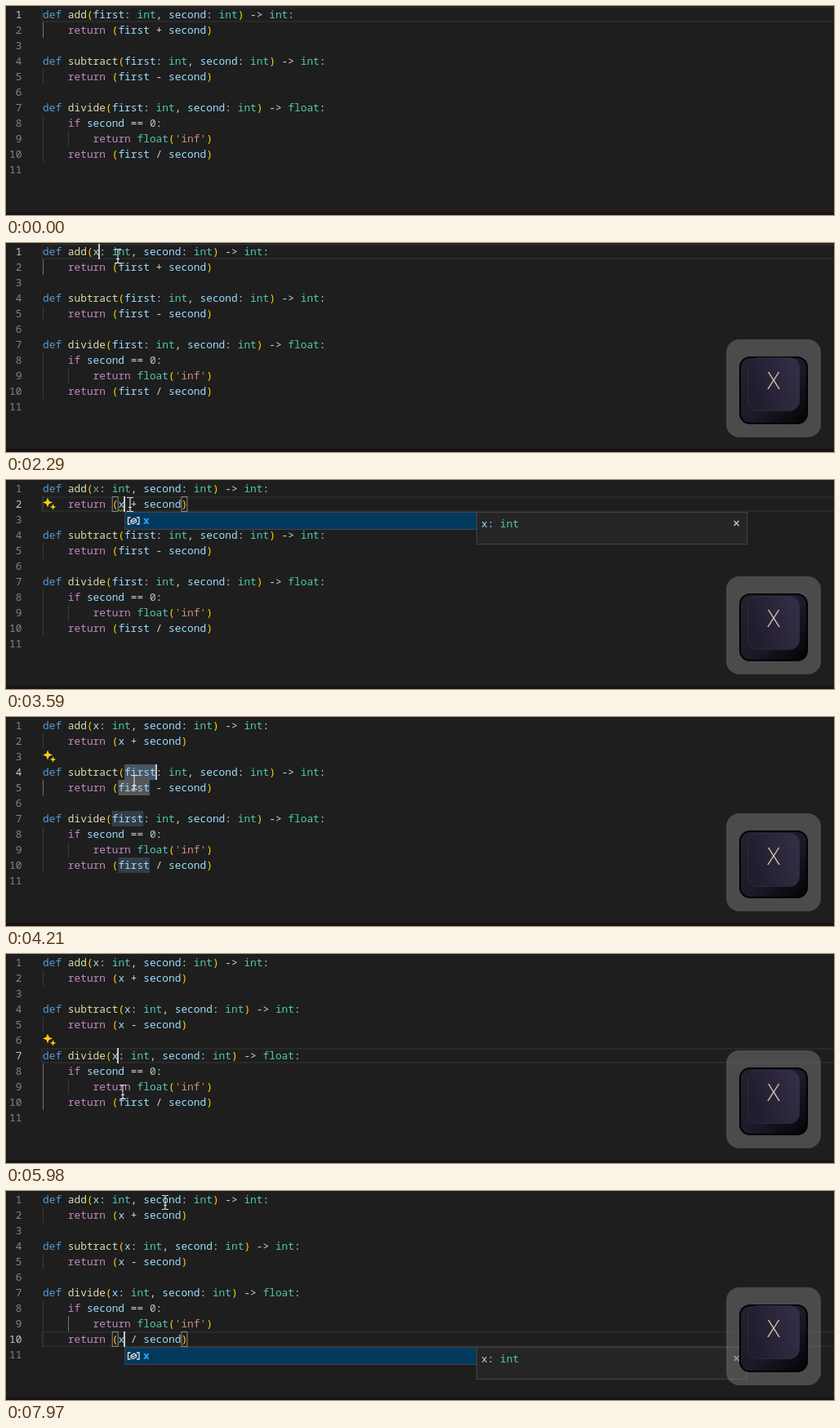
These frames come from a looping animation (1014x256 px, 8 s). An HTML page:

```html
<!DOCTYPE html>
<html lang="en">
<head>
<meta charset="utf-8">
<title>Renaming a parameter</title>
<style>
  html, body { margin: 0; width: 100%; height: 100%; overflow: hidden; background: #1e1e1e; }
  svg { display: block; width: 1014px; height: 256px; }
  text { font: 12.83px "Noto Sans Mono", "DejaVu Sans Mono", monospace; white-space: pre; }
  #letter { font: 300 29px "Open Sans", "Noto Sans", sans-serif; }
</style>
</head>
<body>
<svg viewBox="0 0 1014 256">
  <defs>
    <linearGradient id="base" x1="0" y1="0" x2="1" y2="1">
      <stop offset="0" stop-color="#23222f"/>
      <stop offset=".55" stop-color="#1b1a28"/>
      <stop offset="1" stop-color="#020204"/>
    </linearGradient>
    <linearGradient id="cap" x1="0" y1=".3" x2="1" y2="0">
      <stop offset="0" stop-color="#211c2e"/>
      <stop offset="1" stop-color="#353048"/>
    </linearGradient>
  </defs>
  <rect width="1014" height="256" fill="#1e1e1e"/>
  <g id="editor"></g>
  <rect y="252" width="1014" height="4" fill="#1a1316"/>
  <g id="key">
    <rect x="882" y="118" width="116" height="120" rx="16" fill="#787878" opacity=".5"/>
    <rect x="899" y="140" width="82" height="81" rx="12" fill="url(#base)" stroke="#000" stroke-width="2"/>
    <g id="top">
      <rect x="908.5" y="140.5" width="63" height="65" rx="12" fill="url(#cap)" stroke="#3a3549" stroke-opacity=".6"/>
      <text id="letter" x="940" y="178.500" text-anchor="middle" fill="#d3c9ab">X</text>
    </g>
  </g>
  <g id="pointer">
    <circle id="ring" r="11.5" fill="#d8d21c" opacity=".68"/>
    <path d="M-4-8.500h2.500q1.500 0 1.500 1.500V7q0 1.500-1.500 1.500H-4M4-8.500H1.500Q0-8.500 0-7V7q0 1.500 1.500 1.500H4M-2 3.500h4" fill="none" stroke="#e4e4e4" stroke-width="1.100"/>
  </g>
</svg>
<script>
const LOOP = 8000, CW = 7.7, LH = 19, LEFT = 45;
const $ = id => document.getElementById(id);

const code = [
  "def add(first: int, second: int) -> int:",
  "    return (first + second)",
  "",
  "def subtract(first: int, second: int) -> int:",
  "    return (first - second)",
  "",
  "def divide(first: int, second: int) -> float:",
  "    if second == 0:",
  "        return float('inf')",
  "    return (first / second)",
  ""
];

const colors = [
  [/^def$/, "#569cd6"],
  [/^(return|if)$/, "#c586c0"],
  [/^(int|float)$/, "#4ec9b0"],
  [/^(add|subtract|divide)$/, "#dcdcaa"],
  [/^[a-z]+$/, "#9cdcfe"],
  [/^[()]$/, "#ffd700"],
  [/^'/, "#ce9178"],
  [/^\d/, "#b5cea8"]
];

// One entry per rename: click, double click, typing; then optional follow-ups.
const edits = [
  { row: 1, click: 1290, pick: 1430, type: 1990, hint: [2, 1620, 2060], dim: [2390, 3660] },
  { row: 2, click: 2830, pick: 3040, type: 3450, hint: [2, 3240, 3660], warn: 2390, popup: [3590, 3810] },
  { row: 4, click: 3810, pick: 4010, type: 4290, hint: [3, 4150, 4400], dim: [4690, 5310] },
  { row: 5, click: 4750, pick: 4890, type: 5170, hint: [5, 5000, 5310], warn: 4690, popup: [5310, 5570] },
  { row: 7, click: 5570, pick: 5710, type: 5840, hint: [6, 5770, 6100], dim: [6240, 7000] },
  { row: 10, click: 6380, pick: 6520, type: 6660, warn: 6240, popup: [6730, LOOP] }
];

// time, x, y
const path = [
  [70, 869, 249], [270, 460, 200], [470, 457, 198], [1220, 115, 10], [1430, 122, 12],
  [1620, 125, 13], [2000, 125, 13], [2630, 152, 20], [2830, 152, 29], [3590, 152, 30],
  [3810, 153, 66], [4010, 154, 69], [4210, 157, 80], [4400, 152, 87], [5170, 152, 87],
  [5570, 150, 124], [5710, 148, 126], [5980, 143, 169], [6150, 143, 181],
  [6520, 146, 181], [6880, 197, 19], [7420, 197, 18], [7970, 195, 14]
];

const clamp = v => Math.max(0, Math.min(1, v));
const ramp = (t, a, b) => clamp((t - a) / (b - a));
const smooth = p => p * p * (3 - 2 * p);
const within = (t, a, b) => t >= a && t < b;
const rowY = row => 1 + (row - 1) * LH;
const colX = col => LEFT + col * CW;
const wordCol = row => code[row - 1].indexOf("first");
const rect = (x, y, w, h, attrs) => `<rect x="${x}" y="${y}" width="${w}" height="${h}" ${attrs}/>`;
const fill = c => `fill="${c}"`;
const edge = c => `fill="none" stroke="${c}"`;
const stroke = (d, c, w = 1) => `<path d="${d}" fill="none" stroke="${c}" stroke-width="${w}"/>`;

function tokens(str, x, y, faded) {
  let col = 0, out = "";
  for (const s of str.match(/[a-z]+|'\w+'|\d+|[()]|\s+|[^\w\s()']+/g) || []) {
    const hit = colors.find(([re]) => re.test(s));
    const op = faded && s === "x" ? ' fill-opacity=".66"' : "";
    const safe = s.replace(">", "&gt;");
    if (s.trim()) out += `<tspan x="${x + col * CW}" fill="${hit ? hit[1] : "#d4d4d4"}"${op}>${safe}</tspan>`;
    col += s.length;
  }
  return `<text y="${y}">${out}</text>`;
}

function star(x, y, r) {
  const k = r * 0.28;
  return `<path fill="#ffcc10" d="M${x} ${y - r}L${x + k} ${y - k}L${x + r} ${y}L${x + k} ${y + k}` +
    `L${x} ${y + r}L${x - k} ${y + k}L${x - r} ${y}L${x - k} ${y - k}Z"/>`;
}

function squiggle(x, y, w) {
  let d = `M${x} ${y}`;
  for (let i = 0; i < w - 1; i += 4) d += "q1-3 2-1t2 1";
  return stroke(d, "#cca700");
}

function popup(row) {
  const y = rowY(row) + LH;
  return rect(576.5, y + 0.5, 331, 39, 'fill="#252526" stroke="#454545"') +
    rect(145.5, y + 0.5, 431, 21, 'fill="#04395e" stroke="#454545"') +
    stroke(`M152.500 ${y + 7}h-3v8h3M160 ${y + 7}h3v8h-3`, "#e0e0e0", 1.3) +
    stroke(`M153 ${y + 10.5}l4-2.500 2.500 1.500v3l-4 2-2.500-1.500zl2.500 1.500 4-2.500`, "#e0e0e0", 1.2) +
    `<text x="168" y="${y + 15}" fill="#2aaaff" font-weight="700" style="font-weight:700">x</text>` +
    tokens("x: int", 582, y + 19) +
    stroke(`M891.500 ${y + 11}l6 6m0-6l-6 6`, "#d0d0d0", 1.2);
}

function guides(row) {
  let out = "";
  const line = (x, r, on) => { out += rect(x, rowY(r), 1, LH, fill(on ? "#747474" : "#3a3a3a")); };
  line(45, 2, row === 1);
  line(45, 5, row === 4);
  for (const r of [8, 9, 10]) line(45, r, row === 7);
  line(76, 9, row === 10);
  return out;
}

function editor(t) {
  const cur = edits.filter(e => t >= e.click).pop();
  const row = cur ? cur.row : 1;
  const picked = cur && within(t, cur.pick, cur.type);
  const clicked = cur && t < cur.pick;
  const typed = cur && t >= cur.type;
  let back = "", front = "";

  if (!picked) back += rect(44, rowY(row) + 1, 980, 17, edge("#292929") + ' stroke-width="2"');

  if (picked || clicked) {
    for (const e of edits) {
      if (t >= e.type) continue;
      const own = e === cur, pair = e.row === row + 1;
      const tint = picked
        ? (own ? "#4b5663" : pair ? "#555657" : "#343d47")
        : (own ? "#555657" : "#464747");
      back += rect(colX(wordCol(e.row)), rowY(e.row), 5 * CW, LH, fill(tint));
    }
  }
  back += guides(row);

  code.forEach((src, i) => {
    const n = i + 1, y = rowY(n) + 14;
    const e = edits.find(o => o.row === n);
    const done = e && t >= e.type;
    const str = done ? src.replace("first", "x") : src;
    const faded = e && e.dim && within(t, ...e.dim);
    front += `<text x="19.400" y="${y}" text-anchor="end" fill="${n === row ? "#c6c6c6" : "#858585"}">${n}</text>`;
    front += tokens(str, LEFT, y, faded);
    if (e && e.warn && within(t, e.warn, e.type + 300))
      front += squiggle(colX(wordCol(n)), rowY(n) + 18, (done ? 1 : 5) * CW);
    if (n === row && cur && (clicked || (typed && e.warn))) {
      for (const at of [str.indexOf("("), str.indexOf(")")])
        front += rect(colX(at) + 0.5, rowY(n) + 0.5, 7, 18, edge("#888"));
    }
  });

  if (cur) {
    const since = t - (typed ? cur.type : picked ? cur.pick : cur.click);
    const col = wordCol(row) + (typed ? 1 : picked ? 5 : 2);
    if (since % 1000 < 500) front += rect(Math.round(colX(col)) - 1, rowY(row), 2, LH, fill("#c8c8c8"));
  }
  for (const e of edits) {
    if (e.hint && within(t, e.hint[1], e.hint[2])) {
      const y = rowY(e.hint[0]);
      front += star(51, y + 7.5, 6) + star(57.5, y + 13, 3.8);
    }
    if (e.popup && within(t, ...e.popup)) front += popup(e.row);
  }
  return back + front;
}

function pointer(t) {
  let i = path.findIndex(p => p[0] > t);
  if (i < 0) return path[path.length - 1].slice(1);
  if (i === 0) return [869, 290];
  const [a, x, y] = path[i - 1], [b, u, v] = path[i];
  const p = smooth(ramp(t, a, b));
  return [x + (u - x) * p, y + (v - y) * p];
}

function keyDrop(t) {
  return Math.max(...edits.map(({ type }) => {
    const s = t - type + 140;
    return 4 * Math.min(ramp(s, 0, 120), 1 - ramp(s, 220, 340));
  }));
}

function draw(t) {
  const scroll = 26 * (ramp(t, 6640, 6730) - ramp(t, 7420, 7560));
  $("editor").setAttribute("transform", `translate(0 ${-scroll})`);
  $("editor").innerHTML = editor(t);
  $("key").setAttribute("opacity", ramp(t, 1760, 1960));
  $("top").setAttribute("transform", `translate(0 ${keyDrop(t)})`);
  const [x, y] = pointer(t);
  $("pointer").setAttribute("transform", `translate(${x} ${y})`);
  const pressed = edits.some(e => within(t, e.click, e.click + 200));
  $("ring").setAttribute("visibility", pressed ? "visible" : "hidden");
}

function loop() {
  draw(performance.now() % LOOP);
  requestAnimationFrame(loop);
}
loop();
</script>
</body>
</html>
```
